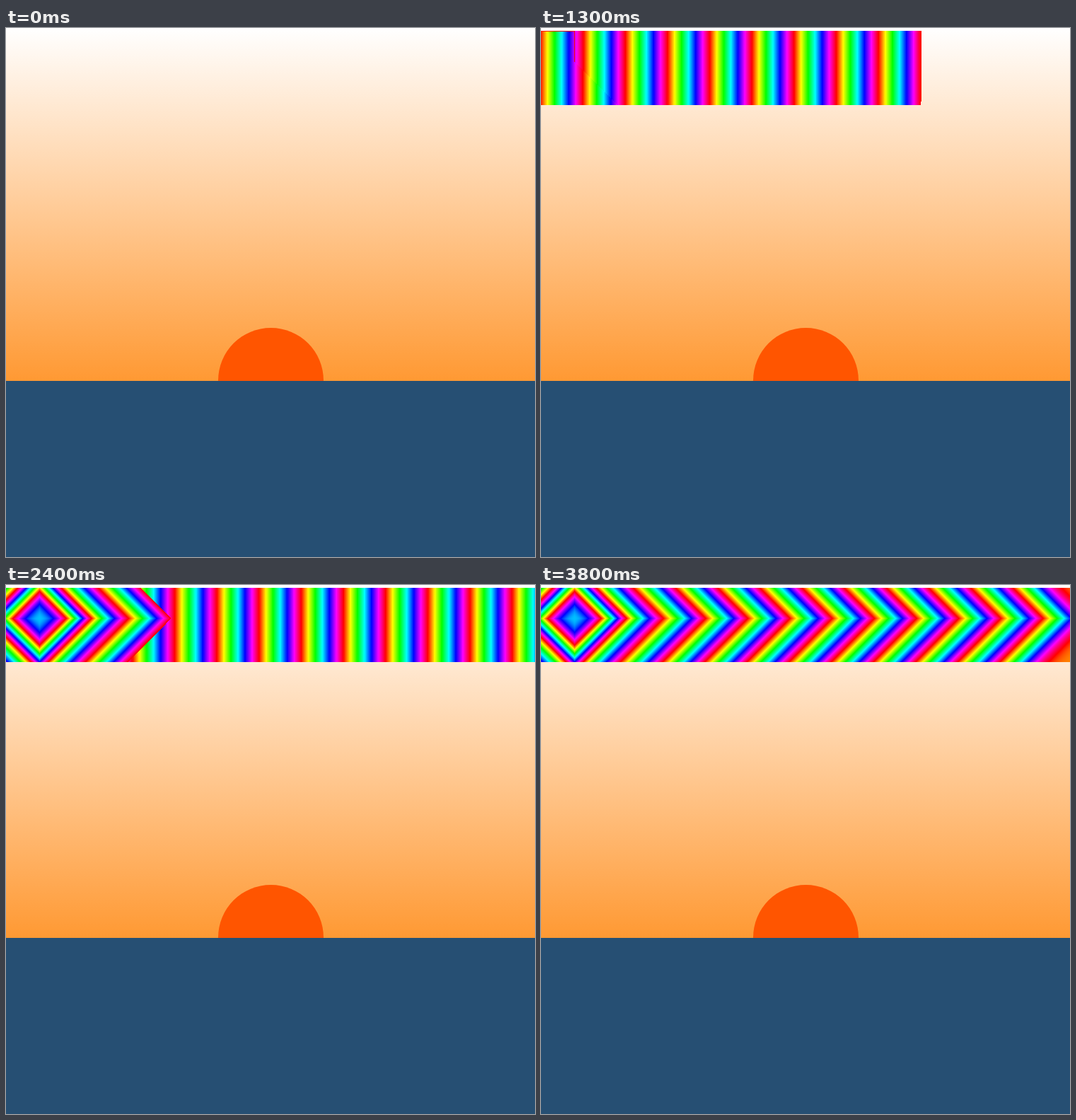
An HTML page with a canvas for the animation above (3.9 s loop, 748 by 748 pixels).

```html
<!DOCTYPE html>
<html lang="en">
<head>
<meta charset="utf-8">
<title>Flood fill</title>
<style>
  html, body { margin: 0; width: 100%; height: 100%; overflow: hidden; }
  #scene {
    position: relative; width: 748px; height: 748px; overflow: hidden;
    background: linear-gradient(#fff, #f93 499px);
  }
  #sun {
    position: absolute; left: 300px; top: 424px; width: 149px; height: 149px;
    border-radius: 50%; background: #f50;
  }
  #sea { position: absolute; left: 0; top: 499px; width: 748px; height: 249px; background: #264f73; }
  canvas { position: absolute; left: 0; top: 4px; }
</style>
</head>
<body>
<div id="scene">
  <div id="sun"></div>
  <div id="sea"></div>
  <canvas id="band" width="748" height="105"></canvas>
</div>
<script>
const W = 748, H = 105, TOTAL = W * H;
const STEP = 100, LOOP = 3900;   // ms
const RATE = 4345;               // pixels filled per step
const CYCLE = 6262;              // pixels per turn of the hue
const SEED = 43 * W + 47;

// Free neighbours are tried in the order up, left, down, right.
function neighbours(p) {
  const x = p % W;
  return [
    p >= W ? p - W : -1,
    x > 0 ? p - 1 : -1,
    p < TOTAL - W ? p + W : -1,
    x < W - 1 ? p + 1 : -1
  ];
}

function depthFirst() {
  const seen = new Uint8Array(TOTAL), order = [SEED], stack = [SEED];
  seen[SEED] = 1;
  while (stack.length) {
    const next = neighbours(stack[stack.length - 1]).find(q => q >= 0 && !seen[q]);
    if (next === undefined) { stack.pop(); continue; }
    seen[next] = 1;
    order.push(next);
    stack.push(next);
  }
  return order;
}

function breadthFirst() {
  const seen = new Uint8Array(TOTAL), order = [SEED];
  seen[SEED] = 1;
  for (let i = 0; i < order.length; i++) {
    for (const q of neighbours(order[i])) {
      if (q < 0 || seen[q]) continue;
      seen[q] = 1;
      order.push(q);
    }
  }
  return order;
}

const ctx = document.getElementById('band').getContext('2d');
const deep = depthFirst(), wide = breadthFirst();
const image = ctx.createImageData(W, H);

const channel = (hue, shift) => 255 * Math.min(1, Math.max(0, Math.abs((hue + shift) % 6 - 3) - 1));

function paint(order, count, offset) {
  const d = image.data;
  for (let i = 0; i < count; i++) {
    const hue = (i + offset) / CYCLE * 6 % 6, k = order[i] * 4;
    d[k] = channel(hue, 0);
    d[k + 1] = channel(hue, 4);
    d[k + 2] = channel(hue, 2);
    d[k + 3] = 255;
  }
}

function draw(step) {
  const deepSteps = Math.ceil(TOTAL / RATE);
  image.data.fill(0);
  paint(deep, Math.min(TOTAL, step * RATE), 0);
  if (step > deepSteps) paint(wide, Math.min(TOTAL, (step - deepSteps) * RATE), TOTAL);
  ctx.putImageData(image, 0, 0);
}

let shown = -1;
const start = performance.now();
function tick() {
  const step = Math.floor((performance.now() - start) % LOOP / STEP);
  if (step !== shown) draw(shown = step);
  requestAnimationFrame(tick);
}
tick();
</script>
</body>
</html>
```
